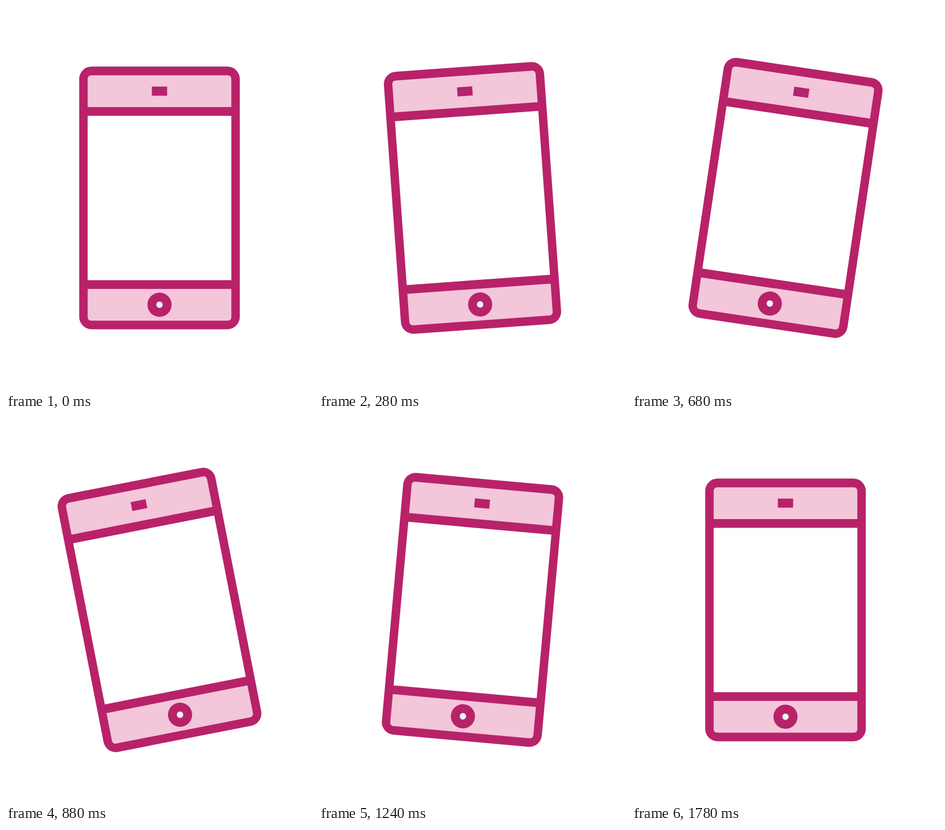
These frames come from a looping animation (544 px wide and 680 px high, 1980 ms). An HTML page:

```html
<!DOCTYPE html>
<html lang="en">
<head>
<meta charset="utf-8">
<title>Shaking phone</title>
<style>
  html, body { margin: 0; width: 100%; height: 100%; overflow: hidden; background: #fff; }
  svg { display: block; width: 100vw; height: 100vh; }
</style>
</head>
<body>
<svg viewBox="0 0 544 680">
  <g id="phone" fill="#b82269">
    <rect x="129.7" y="107.2" width="284.6" height="465.2" rx="22"/>
    <rect x="144.7" y="122.7" width="254.6" height="434.6" rx="6" fill="#f3c6da"/>
    <path d="M144 179H400V501H144Z"/>
    <path d="M144.7 194.6H399.3V485.4H144.7Z" fill="#fff"/>
    <path d="M258.5 142.7H285.5V158.8H258.5Z"/>
    <circle cx="272" cy="529" r="21.4"/>
    <circle cx="272" cy="529" r="5.7" fill="#eaf4fb"/>
  </g>
</svg>
<script>
const LOOP = 1980, STEP = 20;
const phone = document.getElementById('phone');

// Swing poses: [step, degrees]
const poses = [[0, 0], [6, -16.4], [14, -4.1], [24, 11.1], [27.5, 15.4], [44, -11.1],
  [47.5, -15.4], [62, 5.15], [69.5, 15.4], [74, 9.8], [81, 1.5], [89, 0]];

const rate = i => (poses[i + 1][1] - poses[i][1]) / (poses[i + 1][0] - poses[i][0]);

// Harmonic mean of the neighbouring rates, flat at each turning point
function slope(i) {
  if (i === 0) return rate(0);
  if (i === poses.length - 1) return 0;
  const a = rate(i - 1), b = rate(i);
  return a * b > 0 ? 2 * a * b / (a + b) : 0;
}

function angle(step) {
  const next = poses.findIndex(p => p[0] > step);
  if (next < 0) return 0;
  const i = next - 1, [x0, y0] = poses[i], [x1, y1] = poses[next];
  const w = x1 - x0, u = (step - x0) / w, v = 1 - u;
  return v * v * ((1 + 2 * u) * y0 + u * w * slope(i))
       + u * u * ((1 + 2 * v) * y1 - v * w * slope(next));
}

const start = performance.now();
function draw() {
  const step = Math.floor((performance.now() - start) % LOOP / STEP);
  phone.setAttribute('transform', `rotate(${angle(step)} 272 340)`);
  requestAnimationFrame(draw);
}
draw();
</script>
</body>
</html>
```
